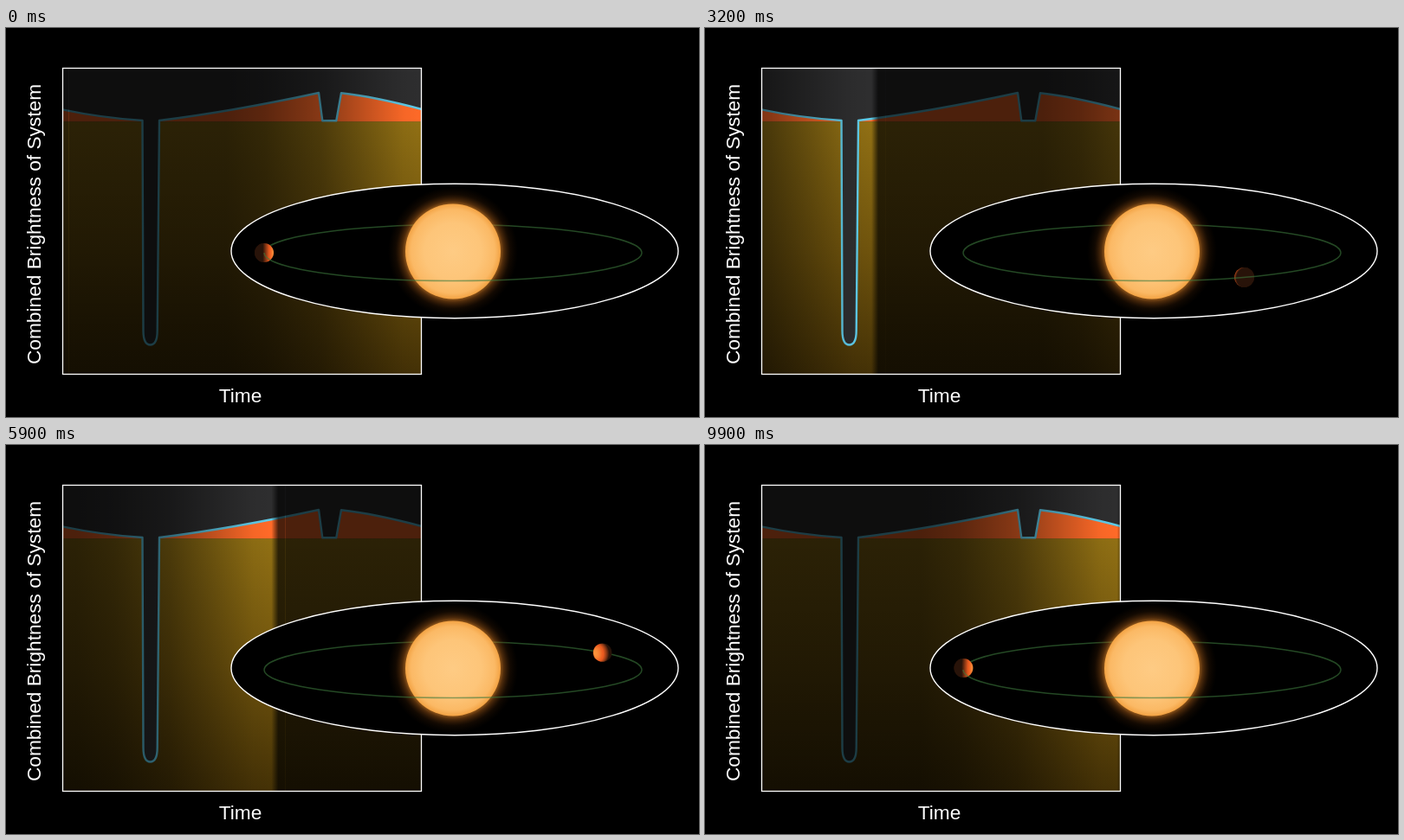
An HTML page with a canvas that plays this animation: 800x450 px, repeating every 10000 ms.

```html
<!DOCTYPE html>
<html lang="en">
<head>
<meta charset="utf-8">
<title>Phase curve</title>
<style>
html, body { margin: 0; width: 100%; height: 100%; overflow: hidden; background: #000; }
canvas { display: block; }
</style>
</head>
<body>
<canvas id="stage" width="800" height="450"></canvas>
<script>
const ctx = document.getElementById('stage').getContext('2d');
const LOOP = 10000, STEP = 100, TAU = Math.PI * 2;
const BOX = { x: 65.5, y: 46.5, w: 414, h: 354 };
const SWEEP = { start: 60.6, span: 423.4 };
const STAR = { x: 516, y: 258.5, r: 55 };
const ORBIT = { x: 516, y: 260, rx: 218, ry: 32.5 };
const FONT = '22.7px "Liberation Sans", Arial, sans-serif';

const clamp = v => Math.max(0, Math.min(1, v));
const mix = (a, b, k) => a.map((v, i) => Math.round(v + (b[i] - v) * k));
const rgb = c => `rgb(${c.join()})`;

function gradient(g, stops) {
  for (const [at, color] of stops) g.addColorStop(at, color);
  return g;
}

function lightCurve() {
  ctx.beginPath();
  ctx.moveTo(65, 94.3);
  ctx.quadraticCurveTo(110, 103.8, 157.5, 107);
  ctx.lineTo(158.5, 350);
  ctx.bezierCurveTo(158.5, 361, 161, 366.5, 166.5, 366.5);
  ctx.bezierCurveTo(172, 366.5, 174.7, 361, 174.7, 350);
  ctx.lineTo(177, 107);
  ctx.quadraticCurveTo(260, 96.8, 361, 75);
  ctx.lineTo(365.3, 107.3);
  ctx.lineTo(381.3, 107.3);
  ctx.lineTo(387, 75.3);
  ctx.quadraticCurveTo(425, 79.5, 480, 94);
}

// Darkens the chart everywhere except a trail behind the sweep edge.
function shade(edge) {
  const dark = a => `rgba(0,0,0,${a})`;
  const tail = 230, x0 = edge - tail, width = tail + 4;
  const at = d => (tail - d) / width;
  ctx.fillStyle = gradient(ctx.createLinearGradient(x0, 0, x0 + width, 0), [
    [0, dark(0.7)], [at(185), dark(0.64)], [at(120), dark(0.47)],
    [at(75), dark(0.27)], [at(25), dark(0.04)], [at(4), dark(0)], [1, dark(0.7)]
  ]);
  return { x0, x1: x0 + width };
}

function drawChart(t) {
  const { x, y, w, h } = BOX;
  const edge = SWEEP.start + SWEEP.span * t / LOOP;
  ctx.save();
  ctx.beginPath();
  ctx.rect(x, y, w, h);
  ctx.clip();
  ctx.fillStyle = '#2e2e2f';
  ctx.fillRect(x, y, w, h);

  ctx.save();
  lightCurve();
  ctx.lineTo(480, 401);
  ctx.lineTo(65, 401);
  ctx.closePath();
  ctx.clip();
  ctx.fillStyle = '#ff6a28';
  ctx.fillRect(x, y, w, 62);
  ctx.fillStyle = gradient(ctx.createLinearGradient(0, 108, 0, 400),
    [[0, '#917014'], [0.5, '#70540d'], [1, '#443106']]);
  ctx.fillRect(x, 108.3, w, 293);
  ctx.restore();

  lightCurve();
  ctx.strokeStyle = '#5fcbe8';
  ctx.lineWidth = 2.4;
  ctx.lineJoin = 'round';
  ctx.stroke();

  // The older trail wraps round to the right until the new one takes over.
  const split = Math.max(x, Math.min(x + w, edge + 12));
  shade(edge);
  ctx.fillRect(x, y, split - x, h);
  shade(edge + SWEEP.span);
  ctx.fillRect(split, y, x + w - split, h);
  ctx.restore();

  ctx.strokeStyle = '#fff';
  ctx.lineWidth = 1.3;
  ctx.strokeRect(x, y, w, h);
}

function ellipse(e, from, to) {
  ctx.beginPath();
  ctx.ellipse(e.x, e.y, e.rx, e.ry, 0, from, to);
}

function drawOrbit(from, to) {
  ellipse(ORBIT, from, to);
  ctx.strokeStyle = 'rgba(60,120,60,0.6)';
  ctx.lineWidth = 1.4;
  ctx.stroke();
}

function drawStar() {
  const { x, y, r } = STAR, R = r + 20;
  const disc = (radius, fill) => {
    ctx.beginPath();
    ctx.arc(x, y, radius, 0, TAU);
    ctx.fillStyle = fill;
    ctx.fill();
  };
  disc(R, gradient(ctx.createRadialGradient(x, y, r - 2, x, y, R), [
    [0, 'rgba(235,145,45,0.75)'], [0.25, 'rgba(190,105,28,0.42)'],
    [0.6, 'rgba(130,65,12,0.14)'], [1, 'rgba(90,40,0,0)']
  ]));
  disc(r, gradient(ctx.createRadialGradient(x, y, 0, x, y, r), [
    [0, '#fecb84'], [0.6, '#fdc579'], [0.88, '#fbb965'], [1, '#f3a344']
  ]));
}

// A sphere lit from the star's direction.
function drawPlanet(a) {
  const px = ORBIT.x + ORBIT.rx * Math.cos(a);
  const py = ORBIT.y + ORBIT.ry * Math.sin(a);
  const r = 11 + 0.5 * Math.sin(a);
  const light = [-Math.cos(a), -0.15 * Math.sin(a), -Math.sin(a)];
  const night = [40, 19, 9], day = [236, 92, 32], hot = [255, 160, 66];
  ctx.save();
  ctx.beginPath();
  ctx.arc(px, py, r, 0, TAU);
  ctx.fillStyle = rgb(night);
  ctx.fill();
  ctx.clip();
  for (let y = Math.floor(py - r); y < py + r; y++) {
    for (let x = Math.floor(px - r); x < px + r; x++) {
      const nx = (x + 0.5 - px) / r, ny = (y + 0.5 - py) / r;
      const nz = Math.sqrt(Math.max(0, 1 - nx * nx - ny * ny));
      const lit = nx * light[0] + ny * light[1] + nz * light[2];
      const k = clamp((lit + 0.15) / 0.7);
      const color = mix(mix(night, day, k), hot, clamp((lit - 0.6) / 0.5));
      ctx.fillStyle = rgb(color);
      ctx.fillRect(x, y, 1, 1);
    }
  }
  ctx.restore();
}

function drawSystem(t) {
  ellipse({ x: 518, y: 258, rx: 258, ry: 77.7 }, 0, TAU);
  ctx.fillStyle = '#000';
  ctx.fill();
  ctx.strokeStyle = '#fff';
  ctx.lineWidth = 1.4;
  ctx.stroke();

  const phase = TAU * t / LOOP;
  const a = Math.PI - phase - 0.05 * (1 - Math.cos(phase));
  const front = Math.sin(a) >= 0;
  drawOrbit(Math.PI, TAU);
  if (!front) drawPlanet(a);
  drawStar();
  if (front) drawPlanet(a);
  drawOrbit(0, Math.PI);
}

function label(text, x, y, alpha = 1, turn = 0) {
  if (alpha <= 0) return;
  ctx.save();
  ctx.translate(x, y);
  ctx.rotate(turn);
  ctx.globalAlpha = alpha;
  ctx.font = FONT;
  ctx.textAlign = 'center';
  ctx.fillStyle = '#fff';
  ctx.fillText(text, 0, 0);
  ctx.restore();
}

const fade = (t, start) =>
  Math.min(clamp((t - start) / 335), clamp((start + 1450 - t) / 350));

function draw(t) {
  ctx.fillStyle = '#000';
  ctx.fillRect(0, 0, 800, 450);
  drawChart(t);
  drawSystem(t);
  label('Time', 270.5, 433);
  label('Combined Brightness of System', 39.5, 227, 1, -Math.PI / 2);
  label('Planet blocks Star', 167, 35, fade(t, 1700));
  label('Star blocks Planet', 374, 35, fade(t, 6600));
}

const begin = performance.now();
function tick() {
  const t = (performance.now() - begin) % LOOP;
  draw(Math.floor(t / STEP) * STEP);
  requestAnimationFrame(tick);
}
tick();
</script>
</body>
</html>
```
